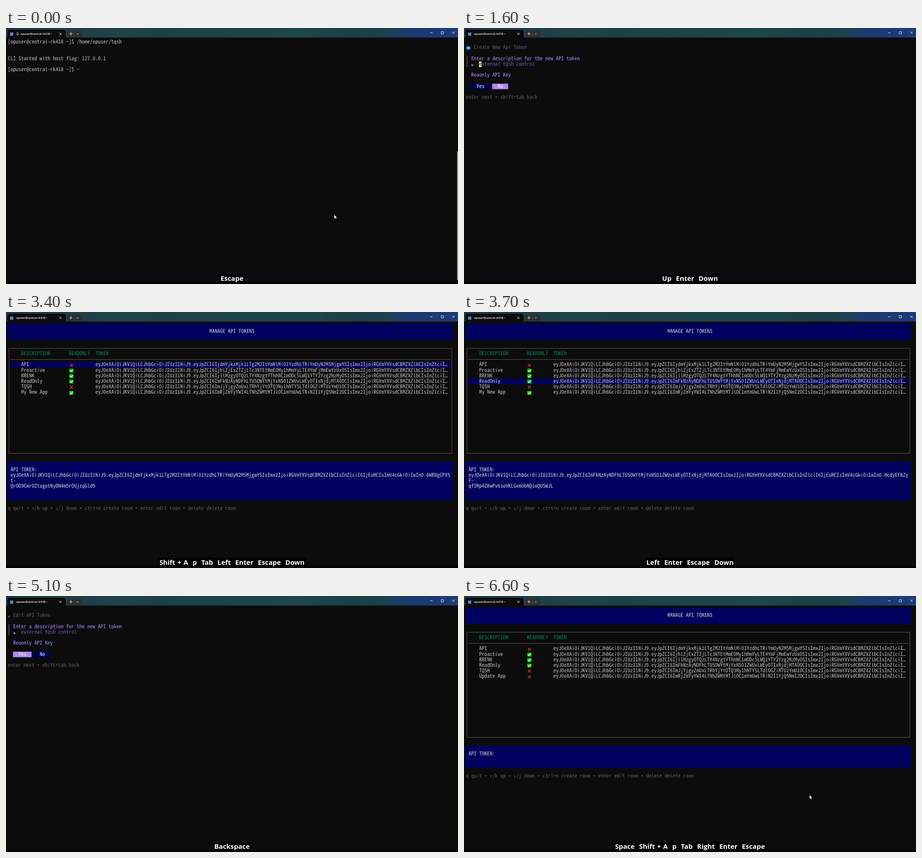
An HTML page for the animation above (6.7 s loop, 992 by 564 pixels).

```html
<!DOCTYPE html>
<html lang="en">
<head>
<meta charset="utf-8">
<title>Terminal</title>
<style>
html, body { margin: 0; width: 100%; height: 100%; overflow: hidden; background: #0c0c0c; }
#stage { position: relative; width: 992px; height: 564px; overflow: hidden; background: #0c0c0c; }
#stage div, #stage svg, #screen span { position: absolute; }
#bar { left: 0; top: 0; width: 992px; height: 21px;
  background: linear-gradient(90deg, #1c3646 0, #1f3f49 170px, #20434a 250px, #1c4247 330px, #1d464a 640px, #1b4049 780px, #1d424f 835px, #1d3a70 880px, #1b3a78 992px); }
#tab { left: 3px; top: 4px; width: 128px; height: 17px; border-radius: 5px 5px 0 0; background: #0c0c0c; }
#mark { left: 9px; top: 9.5px; width: 7px; height: 7px; background: #5c83bd; }
#add { left: 134px; top: 6px; width: 33px; height: 14px; border-radius: 3px; background: #2d3032; }
#chrome { left: 0; top: 0; }
#foot { left: 0; top: 560px; width: 992px; height: 4px; background: #050004; }
#screen { left: 0; top: 0; width: 992px; height: 564px;
  font-family: "Noto Sans Mono CJK JP", "Noto Sans Mono", monospace;
  font-kerning: none; font-variant-ligatures: none; text-rendering: geometricPrecision; }
#screen span { white-space: pre; line-height: 12.2px; height: 12.2px; }
#screen i { display: inline-block; width: 5.82px; text-indent: -.4px; font: 10.8px/1 "DejaVu Sans Mono", monospace; }
#screen .title { top: 7px; font: 600 6px/12px "Open Sans", sans-serif; color: #fff; }
#caption { left: 0; top: 542px; width: 992px; height: 21px; text-align: center; }
#stage #keys { position: static; display: inline-block; height: 21px; padding: 0 2.5px;
  background: #000; color: #fff; white-space: pre;
  font: 700 14.85px/18px "Open Sans", sans-serif; word-spacing: 1px; vertical-align: top; }
</style>
</head>
<body>
<div id="stage">
  <div id="bar"></div>
  <div id="tab"></div>
  <div id="mark"></div>
  <div id="add"></div>
  <svg id="chrome" width="992" height="21" fill="none" stroke="#e8e8e8" stroke-width="1">
    <path d="M117 10.5l5 5m0-5l-5 5M139 12.7h7m-3.5-3.5v7M155.5 12l2 2 2-2"/>
    <path d="M150.5 8v10" stroke="#484b4d"/>
    <path d="M930.5 10.5h5.5M955 8h5v5h-5zM979.5 8l5 5m0-5l-5 5"/>
  </svg>
  <div id="foot"></div>
  <div id="screen"></div>
  <div id="caption"><div id="keys"></div></div>
</div>
<script>
const LOOP = 6700, CELL = 5.82, ROW = 12.18, X0 = 3.7, Y0 = 25.2;
const FG = '#c0c0c0', DIM = '#5c5c5c', LINE = '#585858', NAVY = '#00005f', VIOLET = '#af87ff', YELLOW = '#ffff87';
const USER = 'opuser@central-rk418', CMD = '/home/opuser/tqsh';
const PROMPT = `[${USER} ~]$ `;
const screen = document.getElementById('screen');
const keys = document.getElementById('keys');

// choose the font size whose advance equals one cell
const pen = document.createElement('canvas').getContext('2d');
pen.font = '100px "Noto Sans Mono CJK JP", "Noto Sans Mono", monospace';
screen.style.fontSize = CELL / pen.measureText('M').width * 100 + 'px';

const px = col => X0 + col * CELL;
const py = row => Y0 + row * ROW;
const icon = (x, y, w, h, body) => `<svg style="left:${x}px;top:${y}px" width="${w}" height="${h}" fill="none">${body}</svg>`;
// drawn as vectors so that fractional edges stay soft
const rect = (x, y, w, h, color, line = 'none') => icon(0, 0, 992, 564,
  `<rect x="${x}" y="${y}" width="${w}" height="${h}" fill="${color}" stroke="${line}"/>`);
const fill = (col, row, w, h, color) => rect(px(col), py(row), w * CELL, h * ROW, color);
const text = (col, row, str, color = FG) =>
  `<span style="left:${px(col) + .4}px;top:${py(row) - 1.1}px;color:${color}">${str.replace(/[^ -~]/g, '<i>$&</i>')}</span>`;

const tab = bell => `<span class="title" style="left:${bell ? 32 : 22}px">${USER}:~</span>` + (bell
  ? icon(22, 9, 7, 8, '<path d="M1 5.5h5L5.3 4V2.6a1.8 1.8 0 0 0-3.6 0V4zM2.7 7h1.6" stroke="#ddd" stroke-width=".8"/>') : '');
const mouse = (x, y) => icon(x, y, 8, 12,
  '<path d="M.3.3V9l2-1.8 1.4 3 1.4-.6-1.3-2.9h2.8z" fill="#fff" stroke="#111" stroke-width=".4"/>');

function shell(input, first, ran) {
  const started = 'CLI Started with host flag: 127.0.0.1';
  return tab(first) + text(0, 0, PROMPT + CMD) + text(0, 3, started) + text(0, 5, PROMPT + input) +
    (ran ? text(0, 8, started) : '') +
    (first ? rect(990, 272, 2, 283, '#9c9c9c') + mouse(720, 411) : '');
}

// sample tokens with seeded ids
function randomizer(seed) {
  return n => (seed = (seed * 48271 + 11) % 2147483647) % n;
}
function token(seed) {
  const next = randomizer(seed * 7919 + 4021);
  const pick = (set, n) => Array.from({ length: n }, () => set[next(set.length)]).join('');
  const id = [8, 4, 4, 4, 12].map(n => pick('0123456789abcdef', n)).join('-');
  const pack = obj => btoa(JSON.stringify(obj)).replace(/=/g, '');
  const letters = 'ABCDEFGHIJKLMNOPQRSTUVWXYZabcdefghijklmnopqrstuvwxyz0123456789';
  return pack({ typ: 'JWT', alg: 'HS256' }) + '.' +
    pack({ id, lv: 'Default Level', ver: '1.0', expi: '0' }) + '.' +
    pick(letters, 10) + '-' + pick(letters, 32);
}

const BASE = [['API', 0], ['Proactive', 1], ['BRENK', 1], ['ReadOnly', 1], ['TQSH', 0]];
const CHECK = '<path d="M0 0h9v8.5H0z" fill="#16c60c"/><path d="M1.7 4.3l2 2 3.6-4" stroke="#fff" stroke-width="1.3"/>';
const CROSS = '<path d="M1.2 1.2l6.4 6.4m0-6.4L1.2 7.6" stroke="#f03a17" stroke-width="1.4"/>';

function tableFrame() {
  return tab() + fill(0, 0, 168, 3, NAVY) +
    rect(px(.5), py(4.5), 167 * CELL, 19 * ROW, 'none', LINE);
}

function list(extra, selected = -1) {
  const rows = extra ? [...BASE, extra] : BASE;
  const open = selected >= 0;
  let out = tableFrame() + text(76, 1, 'MANAGE API TOKENS', '#d4d4d4') +
    text(5, 5, 'DESCRIPTION', '#00875f') + text(23, 5, 'READONLY', '#00875f') + text(33, 5, 'TOKEN', '#00875f') +
    rect(px(1), py(6.5) - .5, 166 * CELL, 1, LINE);
  if (open) out += fill(1, 7 + selected, 166, 1, NAVY);
  rows.forEach(([name, readonly], i) => {
    const row = 7 + i;
    out += text(5, row, name) + text(33, row, token(i + 1).slice(0, 132) + '…') +
      icon(139, py(row) + 2.3, 9, 9, readonly ? CHECK : CROSS);
  });
  out += fill(0, 25, 168, open ? 7 : 4, NAVY) + text(1, 26, 'API TOKEN:', '#d4d4d4');
  if (open) {
    const full = token(selected + 1);
    [full.slice(0, 166), full.slice(166, 168), full.slice(168)].forEach((part, i) => {
      out += text(1, 27 + i, part, '#d4d4d4');
    });
  }
  return out + text(0, open ? 33 : 30,
    'q quit • ↑/k up • ↓/j down • ctrl+n create room • enter edit room • delete delete room', DIM);
}

function button(col, w, label, active) {
  return fill(col, 8, w, 1, active ? VIOLET : NAVY) + text(col + 2, 8, label, active ? YELLOW : '#eeeeee');
}

function form(edit, value, { yes = edit, caret = true, second = false } = {}) {
  const head = edit
    ? icon(3, 41, 8, 8, '<path d="M1.5 6.5l4.5-4" stroke="#8c8c8c" stroke-width="1.2"/>') + text(2, 1, 'Edit API Token', DIM)
    : rect(5, 40, 9, 8, '#0078d7') + rect(6.5, 43, 6, 2, '#d6e8f8') + text(3, 1, 'Create New Api Token', DIM);
  const hint = 'external tqsh control';
  let out = tab() + head +
    rect(5.8, py(second ? 6 : 3), 1.5, ROW * (second ? 3 : 2), '#626262') +
    text(2, 3, 'Enter a description for the new API token', VIOLET) +
    rect(16, 80, 4.3, 4, edit ? '#4a7be0' : '#2f86d6') +
    text(5, 4, value || hint, value ? '#d4d4d4' : '#5f5faf');
  if (caret && !second) {
    out += fill(5 + value.length, 4, 1, 1, YELLOW);
    if (!value) out += text(5, 4, hint[0], '#222222');
  }
  return out + text(2, 6, 'Reaonly API Key', VIOLET) +
    button(2, 7, 'Yes', yes) + button(10, 6, 'No', !yes) +
    text(0, 10, 'enter next • shift+tab back', DIM);
}

const NEW = 'My New App', UPD = 'Update App';
const create = (n, opts) => form(false, NEW.slice(0, n), opts);
const erase = n => form(true, NEW.slice(0, n));
const update = (n, opts) => form(true, UPD.slice(0, n), opts);
const added = [NEW, 1], changed = [UPD, 0];

// time, picture, pressed keys
const steps = [
  [0, shell('~', true), 'Escape'],
  [100, shell(CMD), 'Escape,Up'],
  [200, shell(CMD, false, true), 'Escape,Up,Enter'],
  [300, tableFrame(), 'Up,Enter'],
  [400, tableFrame(), 'Up,Enter,Down'],
  [800, list(), 'Up,Enter,Down'],
  [900, list(null, 0), 'Up,Enter,Down'],
  [1000, list(null, 1), 'Up,Enter,Down'],
  [1100, list(null, 2), 'Up,Enter,Down'],
  [1600, create(0), 'Up,Enter,Down'],
  [1700, create(0), 'Enter,Down'],
  [1800, create(0), 'Down'],
  [1900, create(1), 'Down,Shift + M'],
  [2000, create(2), 'Shift + M,y'],
  [2100, create(3), 'Shift + M,y,Space'],
  [2200, create(4), 'Shift + M,y,Space'],
  [2300, create(5), 'Shift + M,y,Space,e'],
  [2400, create(6), 'Shift + M,y,Space,e,w'],
  [2500, create(7), 'Shift + M,y,Space,e,w,Space'],
  [2700, create(8), 'y,Space,e,w,Space,Shift + A'],
  [2800, create(9), 'e,w,Space,Shift + A,p'],
  [2900, create(10), 'w,Space,Shift + A,p'],
  [3000, create(10, { second: true }), 'Space,Shift + A,p,Tab'],
  [3100, create(10, { second: true, yes: true }), 'Space,Shift + A,p,Tab,Left'],
  [3200, list(added), 'Shift + A,p,Tab,Left,Enter'],
  [3300, list(added), 'Shift + A,p,Tab,Left,Enter,Escape'],
  [3400, list(added, 0), 'Shift + A,p,Tab,Left,Enter,Escape,Down'],
  [3500, list(added, 1), 'p,Tab,Left,Enter,Escape,Down'],
  [3600, list(added, 2), 'Tab,Left,Enter,Escape,Down'],
  [3700, list(added, 3), 'Left,Enter,Escape,Down'],
  [3800, list(added, 4), 'Enter,Escape,Down'],
  [3900, list(added, 5), 'Enter,Escape,Down'],
  [4000, erase(10), 'Enter,Escape,Down,Enter'],
  [4100, erase(9), 'Escape,Down,Enter,Backspace'],
  [4200, erase(8), 'Escape,Down,Enter,Backspace'],
  [4300, erase(6), 'Escape,Down,Enter,Backspace'],
  [4400, erase(5), 'Down,Enter,Backspace'],
  [4500, erase(4), 'Down,Enter,Backspace'],
  [4600, erase(2), 'Down,Enter,Backspace'],
  [4700, erase(1), 'Down,Enter,Backspace'],
  [4800, erase(0), 'Enter,Backspace'],
  [4900, erase(0), 'Backspace'],
  [5100, update(0, { caret: false }), 'Backspace'],
  [5200, update(1), 'Backspace,Shift + U'],
  [5300, update(2), 'Backspace,Shift + U,p'],
  [5400, update(3), 'Backspace,Shift + U,p,d'],
  [5500, update(4), 'Backspace,Shift + U,p,d,a'],
  [5600, update(5), 'Backspace,Shift + U,p,d,a,t'],
  [5700, update(6), 'Backspace,Shift + U,p,d,a,t,e'],
  [5800, update(7), 'Shift + U,p,d,a,t,e,Space'],
  [5900, update(7), 'p,d,a,t,e,Space'],
  [6000, update(8), 'p,d,a,t,e,Space,Shift + A'],
  [6100, update(9), 'd,a,t,e,Space,Shift + A,p'],
  [6200, update(10), 'd,a,t,e,Space,Shift + A,p'],
  [6300, update(10, { second: true }), 'd,a,t,e,Space,Shift + A,p,Tab'],
  [6400, update(10, { second: true, yes: false }), 'd,a,t,e,Space,Shift + A,p,Tab,Right'],
  [6500, list(changed), 'Space,Shift + A,p,Tab,Right,Enter'],
  [6600, list(changed) + mouse(758, 438), 'Space,Shift + A,p,Tab,Right,Enter,Escape']
];

const start = performance.now();
let shown = null;
function draw() {
  const t = (performance.now() - start) % LOOP;
  const step = steps.findLast(s => s[0] <= t) || steps[0];
  if (step !== shown) {
    shown = step;
    screen.innerHTML = step[1];
    keys.textContent = step[2].replaceAll(',', '  ');
  }
  requestAnimationFrame(draw);
}
draw();
</script>
</body>
</html>
```
